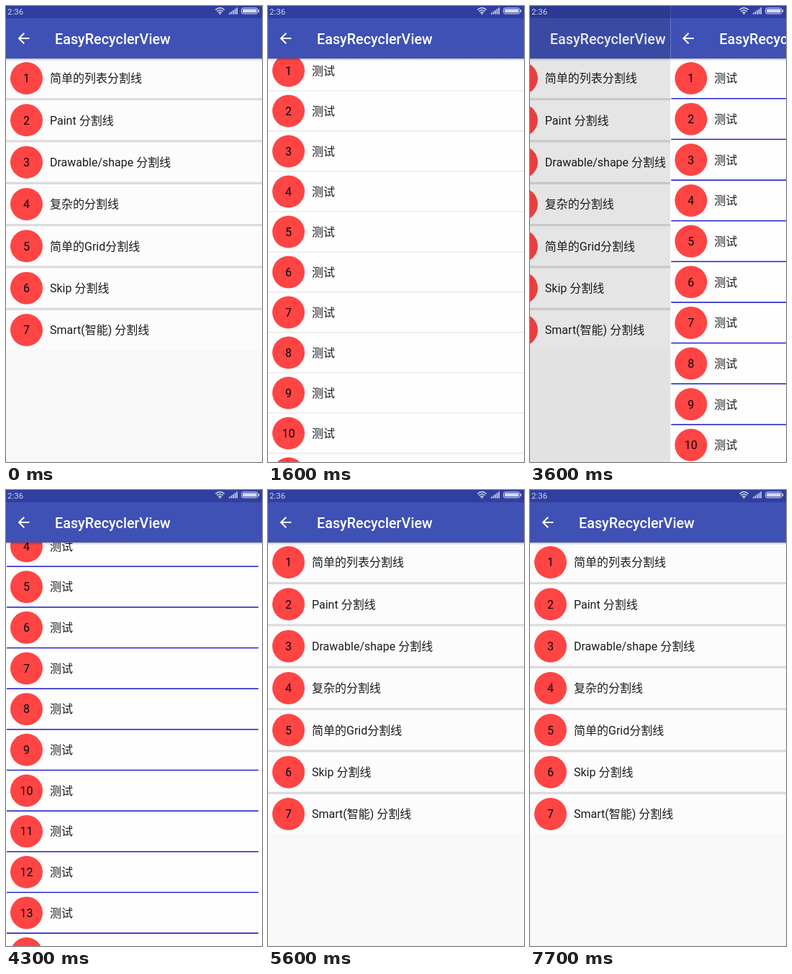
Write an HTML page that moves like this. It is 356x634 px and loops after 8 s.

```html
<!DOCTYPE html>
<html lang="zh-CN">
<head>
<meta charset="utf-8">
<title>EasyRecyclerView</title>
<style>
  html, body { margin: 0; width: 100%; height: 100%; overflow: hidden; background: #fff; }
  svg { display: block; width: 356px; height: 634px; font-family: Roboto, "Noto Sans CJK SC", "Noto Sans CJK", sans-serif; }
  .title { font-size: 19.8px; font-weight: 500; fill: #fff; }
  .row { font-size: 16px; fill: #1c1c1c; }
  .num { font-size: 16px; fill: #0a0a0a; text-anchor: middle; }
  .clock { font-size: 11.5px; fill: #d0d4ec; }
</style>
</head>
<body>
<svg id="stage" viewBox="0 0 356 634">
  <defs>
    <linearGradient id="shade" x1="0" y1="0" x2="0" y2="1">
      <stop offset="0" stop-color="#000" stop-opacity=".24"/>
      <stop offset="1" stop-color="#000" stop-opacity="0"/>
    </linearGradient>
  </defs>
  <g id="pages"></g>
  <g id="status">
    <text class="clock" x="2" y="11.5">2:36</text>
    <g fill="none" stroke="#d6d9ee" stroke-width="1.4">
      <path d="M291.2 5.2Q297.5 -.2 303.8 5.2M293.2 7.4Q297.5 3.8 301.8 7.4M295.2 9.5Q297.5 7.6 299.8 9.5"/>
      <rect x="327.5" y="2.8" width="22.6" height="8" rx="2.6" stroke-width="1"/>
    </g>
    <g fill="#d6d9ee">
      <circle cx="297.5" cy="10.8" r="1.1"/>
      <rect x="329" y="4.3" width="19.6" height="5" rx="1.2"/>
      <rect x="350.8" y="5" width="1.4" height="3.6"/>
    </g>
  </g>
</svg>
<script>
const W = 356, H = 634, TOP = 73, ROW = 55;
const LOOP = 8000, STEP = 100, SLIDE = 270;

function add(parent, tag, attrs, text) {
  const el = document.createElementNS('http://www.w3.org/2000/svg', tag);
  for (const key in attrs) el.setAttribute(key, attrs[key]);
  if (text) el.textContent = text;
  parent.appendChild(el);
  return el;
}

function makePage({ labels, gap, line, inset = [0, W], back, rowFill }) {
  const page = add(document.getElementById('pages'), 'g', {});
  add(page, 'rect', { width: W, height: H, fill: back });
  const rows = add(page, 'g', {});
  labels.forEach((label, i) => {
    const y = TOP + i * (ROW + gap), mid = y + ROW / 2;
    add(rows, 'rect', { y, width: W, height: ROW, fill: rowFill });
    add(rows, 'rect', { x: inset[0], y: y + ROW, width: inset[1] - inset[0], height: gap, fill: line });
    add(rows, 'circle', { cx: 28.5, cy: mid, r: 22.5, fill: '#ff4444' });
    add(rows, 'text', { class: 'num', x: 28.5, y: mid + 5.8 }, String(i + 1));
    add(rows, 'text', { class: 'row', x: 61, y: mid + 5.8 }, label);
  });
  // the last row has no divider
  rows.children[(labels.length - 1) * 5 + 1].remove();
  add(page, 'rect', { y: TOP, width: W, height: 3.5, fill: 'url(#shade)' });
  add(page, 'rect', { width: W, height: TOP, fill: '#3f51b5' });
  add(page, 'rect', { width: W, height: 17, fill: '#303f9f' });
  add(page, 'path', {
    d: 'M20 11H7.83l5.59-5.59L12 4l-8 8 8 8 1.41-1.41L7.83 13H20z',
    transform: 'translate(12.7 33.1) scale(.989)', fill: '#fff'
  });
  add(page, 'text', { class: 'title', x: 68, y: 52.7 }, 'EasyRecyclerView');
  return { page, rows };
}

const tests = Array(50).fill('测试');
const grey = '#dcdcdc';
const menu = makePage({
  labels: ['简单的列表分割线', 'Paint 分割线', 'Drawable/shape 分割线', '复杂的分割线',
    '简单的Grid分割线', 'Skip 分割线', 'Smart(智能) 分割线'],
  gap: 3.33, line: grey, back: '#f9f8f8', rowFill: '#fcfcfc'
});
const dim = add(menu.page, 'rect', { width: W, height: H, fill: '#000', opacity: 0 });

const list = (gap, line, inset) =>
  makePage({ labels: tests, gap, line, inset, back: '#fefefe', rowFill: '#fefefe' });

const clamp = v => Math.min(1, Math.max(0, v));
const easeOut = (u, power) => 1 - Math.pow(1 - clamp(u), power);

// open / close: moments at which each slide begins
const visits = [
  { ...list(1, '#d8d8d8'), open: 793, close: 2270,
    scroll: t => t < 1600 ? 0 : t < 1700 ? 10.5 : 16 },
  { ...list(1.65, '#1a1ac8', [1, 351]), open: 3530, close: 5270,
    scroll: t => t < 4300 ? 0 : 192.4 + 460 * easeOut((t - 4300) / 800, 2.4) },
  { ...list(3.33, grey), open: 6365, close: 7370, scroll: () => 0 }
];

for (let i = 0; i < 5; i++) {
  const h = 2 + i * 1.8;
  add(document.getElementById('status'), 'rect',
    { x: 310 + i * 2.6, y: 11.5 - h, width: 1.6, height: h, fill: '#d6d9ee' });
}

function draw(now) {
  const t = Math.floor(now % LOOP / STEP) * STEP;
  let cover = 0;
  for (const v of visits) {
    const shown = t < v.close
      ? easeOut((t - v.open) / SLIDE, 2)
      : 1 - easeOut((t - v.close) / SLIDE, 2);
    cover = Math.max(cover, shown);
    v.page.style.display = shown > 0 ? '' : 'none';
    v.page.setAttribute('transform', `translate(${W * (1 - shown)} 0)`);
    v.rows.setAttribute('transform', `translate(0 ${-v.scroll(t)})`);
  }
  menu.page.setAttribute('transform', `translate(${-W * cover / 4} 0)`);
  dim.setAttribute('opacity', cover * .2);
}

const start = performance.now();
function tick() {
  draw(performance.now() - start);
  requestAnimationFrame(tick);
}
tick();
</script>
</body>
</html>
```
